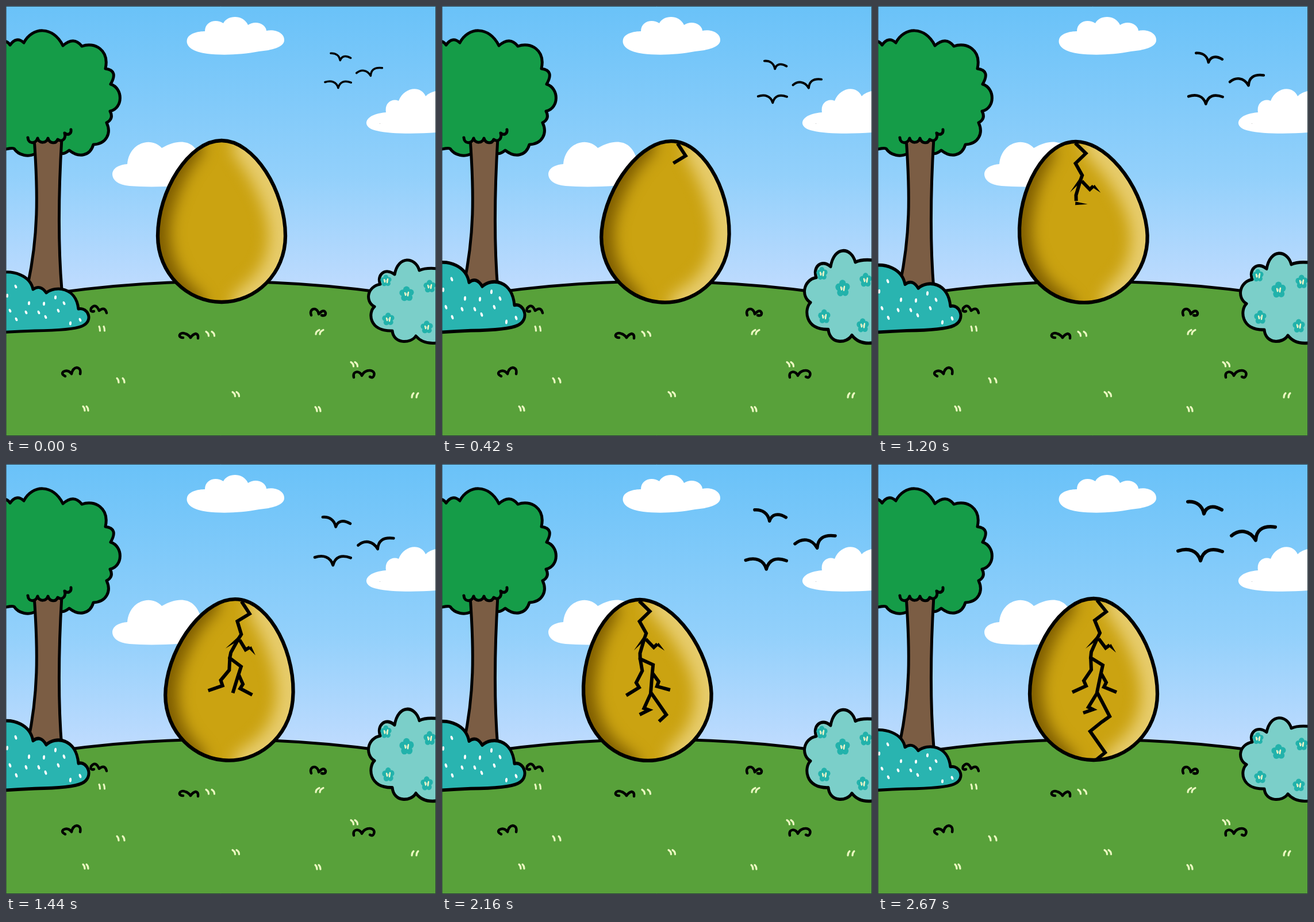
Recreate the animation shown at these times as an HTML page with a canvas. Size 748 px wide and 748 px high, loop 2.7 s.

```html
<!DOCTYPE html>
<html lang="en">
<head>
<meta charset="utf-8">
<title>Hatching egg</title>
<style>
  html, body { margin: 0; width: 100%; height: 100%; overflow: hidden; }
  canvas { display: block; width: 748px; height: 748px; }
</style>
</head>
<body>
<canvas id="stage" width="748" height="748"></canvas>
<script>
const SIZE = 748, LOOP = 2700, STEP = 30, CYCLE = 900;
const ctx = document.getElementById('stage').getContext('2d');
const path = d => new Path2D(d);

const hill = path('M-5 514 Q374 444 753 514');
const clouds = [
  'M350 83C325 80 312 70 315 58C318 47 335 44 346 44C346 26 366 22 378 30C385 16 412 14 421 33C435 24 452 32 453 43C470 40 485 48 484 60C483 72 462 77 440 79C410 85 375 86 350 83Z',
  'M215 313C195 311 185 303 185 292C186 281 198 276 211 275C214 238 252 226 271 247C300 230 328 232 338 264L345 308C310 314 250 316 215 313Z',
  'M645 217C632 215 626 208 627 202C630 190 648 186 661 185C658 168 672 160 683 165C693 140 722 138 730 157Q738 148 760 146L760 219C720 223 670 223 645 217Z'
].map(path);
const canopy = path('M-10 60Q3 60 7 68Q18 52 31 64C45 36 82 34 99 69Q118 52 132 70C154 62 180 76 173 109Q196 112 182 136C204 143 204 178 181 183Q188 196 175 203C184 222 174 240 152 241C146 262 126 264 110 251Q100 259 94 256L52 256C40 264 22 260 14 248Q8 246 -10 252Z');
const trunk = path('M49 230C56 330 56 400 38 485L40 510L97 510L97 493C91 420 91 330 97 230Z');
const scallops = path('M38 229C39 241 52 240 55 230C58 240 70 239 73 230C76 240 87 240 90 232C97 238 105 231 102 221C108 226 114 222 113 215');

const leftBush = path('M-10 464C12 460 42 468 47 493Q60 484 70 499C86 486 122 489 126 527C142 523 154 548 132 557Q116 564 50 565Q20 566 -10 568Z');
const dots = [[2, 504], [17, 488], [7, 530], [40, 517], [18, 545], [35, 533], [66, 518],
  [57, 533], [69, 541], [86, 507], [101, 517], [91, 530], [112, 552], [129, 546]];
const rightBush = path('M760 458Q732 454 719 460C712 436 682 434 676 467C660 454 644 468 651 484C628 488 624 514 641 523C630 532 630 566 672 565C674 588 704 588 713 574Q728 592 760 584Z');
const flowers = [[697, 501, 13], [661, 478, 10], [737, 488, 11], [665, 545, 11], [732, 559, 11]];

const tufts = [
  'M153 531Q146 533 148 526Q156 516 162 530Q172 522 175 534',
  'M531 538C526 526 542 522 544 536Q553 526 556 534Q556 540 549 538',
  'M308 577C298 577 301 566 312 570Q318 572 321 577Q325 571 330 570Q335 571 334 578',
  'M103 644Q95 640 100 636Q108 632 114 640Q116 630 123 629Q131 630 129 640',
  'M605 646C602 634 616 634 619 643C624 630 644 632 640 643Q638 648 633 645'
].map(path);
// x, y, gap to the second blade, lean
const blades = [[163, 561, 8, 1], [351, 570, 10, 3], [541, 567, 7, -4], [195, 651, 10, 2],
  [603, 623, 7, 3], [397, 675, 7, 3], [136, 700, 6, 2], [540, 701, 6, 2], [707, 677, 8, -2]];

const birds = [
  { shape: path('M539 62C553 61 564 68 567 83C571 70 583 67 598 76'), lag: 90 },
  { shape: path('M615 123C628 112 646 112 657 131C658 114 668 105 691 108'), lag: 50 },
  { shape: path('M522 151C540 145 556 150 561 168C566 149 580 145 599 152'), lag: 0 }
];

const egg = path('M375 234C432 234 486 322 486 400C486 465 435 515 375 515C315 515 264 465 264 400C264 322 318 234 375 234Z');
const eggShade = path('M318 246C280 290 258 360 260 400C262 450 285 490 320 518');
const eggLight = path('M426 245C460 290 489 350 489 400C489 450 465 490 425 518');
const crack = [[381, 237], [397, 257], [377, 272], [386, 294], [382, 302], [371, 327], [370, 337],
  [391, 350], [387, 368], [381, 397], [390, 414], [403, 439], [389, 449], [369, 465], [395, 502], [379, 515]];
const crackReach = [0, 2, 3, 6, 7, 10, 11, 13, 14, 16];
const branches = [
  { from: 3, sharp: true, pts: [[382, 302], [361, 321]] },
  { from: 3, sharp: true, pts: [[384, 304], [396, 320], [403, 315], [414, 328]] },
  { from: 4, to: 4, sharp: true, pts: [[368, 341], [389, 345]] },
  { from: 5, pts: [[370, 335], [371, 358], [358, 377], [362, 386], [338, 397]] },
  { from: 5, pts: [[388, 364], [397, 380], [393, 388], [415, 397]] },
  { from: 6, to: 6, pts: [[382, 397], [365, 423]] },
  { from: 7, pts: [[382, 397], [366, 423], [374, 427], [357, 433]] }
];

function fill(shape, color) {
  ctx.fillStyle = color;
  ctx.fill(shape);
}

function stroke(shape, width, color = '#000') {
  ctx.lineWidth = width;
  ctx.strokeStyle = color;
  ctx.stroke(shape);
}

function saved(draw) {
  ctx.save();
  draw();
  ctx.restore();
}

// Smooth rise and fall, 0 to 1 and back once per cycle
const wave = (t, lag) => (1 - Math.cos((t - lag) / CYCLE * 2 * Math.PI)) / 2;

function drawSky() {
  const sky = ctx.createLinearGradient(0, 0, 0, 490);
  sky.addColorStop(0, '#6ac2f8');
  sky.addColorStop(0.6, '#92d0fb');
  sky.addColorStop(1, '#bedbfe');
  ctx.fillStyle = sky;
  ctx.fillRect(0, 0, SIZE, SIZE);
  clouds.forEach(c => fill(c, '#fff'));
  ctx.fillStyle = '#bbb';
  ctx.fillRect(650, 204, 1, 1);
}

function drawBirds(t) {
  const scale = 1 + 0.7 * t / (LOOP - STEP);
  for (const { shape, lag } of birds) saved(() => {
    ctx.translate(602, 106 + 22 * wave(t, lag));
    ctx.scale(scale / 1.7, scale / 1.7);
    ctx.translate(-602, -106);
    stroke(shape, 6);
  });
}

function drawMeadow() {
  const ground = new Path2D(hill);
  ground.lineTo(753, 760);
  ground.lineTo(-5, 760);
  fill(ground, '#58a13a');
  stroke(hill, 5);
  tufts.forEach(s => stroke(s, 4.5));
  for (const [x, y, gap, lean] of blades) {
    const pair = new Path2D();
    for (const bx of [x, x + gap]) {
      pair.moveTo(bx - lean, y - 3.5);
      pair.quadraticCurveTo(bx + lean / 2, y - 1, bx + lean / 2, y + 4);
    }
    stroke(pair, 3.2, '#eaf8c0');
  }
}

function drawTree() {
  fill(canopy, '#159c48');
  stroke(canopy, 5);
  fill(trunk, '#7b5d44');
  stroke(trunk, 5);
  fill(scallops, '#159c48');
  ctx.fillStyle = '#159c48';
  ctx.fillRect(40, 212, 62, 18);
  stroke(scallops, 5);
}

function stretched(baseY, amount, draw) {
  saved(() => {
    ctx.translate(0, baseY);
    ctx.scale(1, 1 + amount);
    ctx.translate(0, -baseY);
    draw();
  });
}

function drawBushes(t) {
  const swell = wave(t, 15);
  stretched(567, 0.168 * swell, () => {
    fill(leftBush, '#29b4b0');
    stroke(leftBush, 5);
    ctx.fillStyle = '#fff';
    dots.forEach(([x, y], i) => {
      ctx.beginPath();
      ctx.ellipse(x, y, 2, 3.4, i % 3 ? -0.4 : 0.1, 0, 7);
      ctx.fill();
    });
  });
  stretched(586, 0.117 * swell, () => {
    fill(rightBush, '#7bcfc9');
    stroke(rightBush, 5);
    for (const [x, y, r] of flowers) {
      ctx.fillStyle = '#22b2ab';
      for (let i = 0; i < 5; i++) {
        const a = i * Math.PI * 0.4 + 0.9;
        ctx.beginPath();
        ctx.arc(x + Math.cos(a) * r * 0.55, y + Math.sin(a) * r * 0.6, r * 0.44, 0, 7);
        ctx.fill();
      }
      stroke(path(`M${x - 3} ${y - 2}l1 4M${x + 3} ${y - 3}l-1 6`), 2.4, '#f4f7c6');
    }
  });
}

function drawCrackLine(pts, sharp) {
  const line = new Path2D();
  const body = sharp ? pts.slice(0, -1) : pts;
  body.forEach(([x, y]) => line.lineTo(x, y));
  stroke(line, 6);
  if (!sharp) return;
  const [[ax, ay], [bx, by]] = pts.slice(-2);
  const k = 3 / Math.hypot(bx - ax, by - ay);
  const nx = (ay - by) * k, ny = (bx - ax) * k;
  fill(path(`M${ax + nx} ${ay + ny}L${bx} ${by}L${ax - nx} ${ay - ny}Z`), '#000');
}

function drawEgg(t) {
  const stage = Math.floor((t + 180) / 300);
  const tilt = [0, -0.125, 0.095][stage % 3];
  saved(() => {
    ctx.translate(374, 540);
    ctx.rotate(tilt);
    ctx.translate(-374, -540);
    fill(egg, '#cba311');
    saved(() => {
      ctx.clip(egg);
      ctx.filter = 'blur(13px)';
      stroke(eggShade, 50, '#7d5c00');
      stroke(eggLight, 64, '#e7cc6c');
    });
    ctx.lineCap = 'butt';
    ctx.lineJoin = 'miter';
    const reach = crackReach[stage];
    if (reach) drawCrackLine(crack.slice(0, reach), false);
    for (const { from, to = 9, sharp, pts } of branches) {
      if (stage >= from && stage <= to) drawCrackLine(pts, sharp);
    }
    stroke(egg, 6.3);
  });
}

function render(now) {
  const t = Math.floor(now % LOOP / STEP) * STEP;
  ctx.lineCap = ctx.lineJoin = 'round';
  drawSky();
  drawBirds(t);
  drawMeadow();
  drawTree();
  drawBushes(t);
  drawEgg(t);
  ctx.lineWidth = 1;
  ctx.strokeStyle = '#2b3a40';
  ctx.strokeRect(0.5, 0.5, SIZE - 1, SIZE - 1);
}

let start;
function tick(now) {
  start ??= now;
  render(now - start);
  requestAnimationFrame(tick);
}
render(0);
requestAnimationFrame(tick);
</script>
</body>
</html>
```
